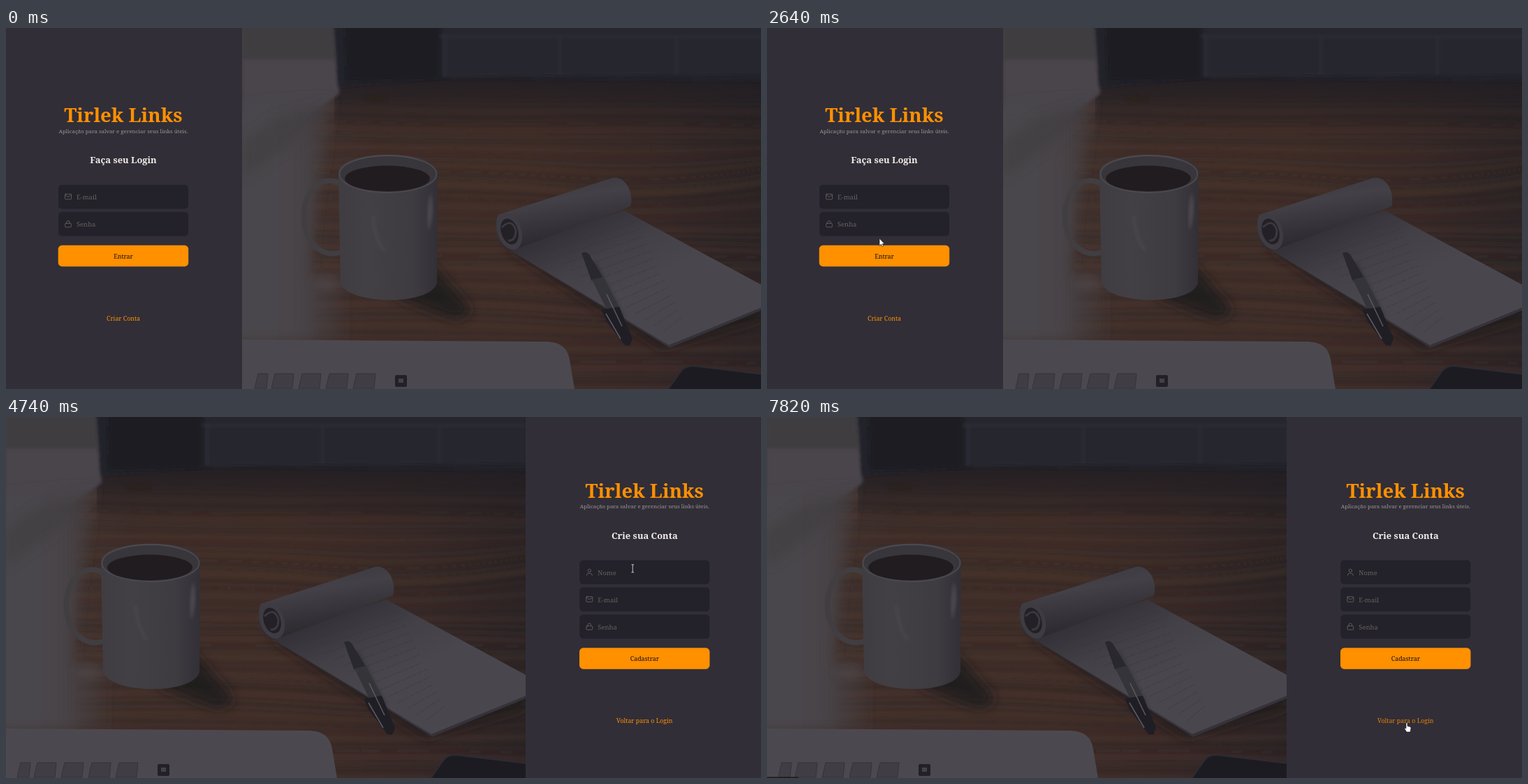
Recreate the animation shown at these times as an HTML page. Size 1081 px wide and 518 px high, loop 8 s.

```html
<!DOCTYPE html>
<html lang="pt-BR">
<head>
<meta charset="utf-8">
<title>Login</title>
<style>
html, body { margin: 0; width: 100%; height: 100%; overflow: hidden; background: #312e38; }
svg { display: block; width: 100vw; height: 100vh; }
text { font-family: "Noto Serif", "DejaVu Serif", serif; }
.icon { fill: none; stroke: #666360; stroke-width: .9; stroke-linejoin: round; stroke-linecap: round; }
.hover { filter: brightness(.9); }
</style>
</head>
<body>
<svg id="stage" viewBox="0 0 1081 518">
  <defs>
    <linearGradient id="wood">
      <stop offset="0" stop-color="#443937"/><stop offset=".25" stop-color="#402f2a"/>
      <stop offset=".55" stop-color="#402e29"/><stop offset=".8" stop-color="#382a28"/>
      <stop offset="1" stop-color="#2d2526"/>
    </linearGradient>
    <linearGradient id="glare">
      <stop offset="0" stop-color="#49474d"/><stop offset=".55" stop-color="#48454a"/>
      <stop offset="1" stop-color="#48454a" stop-opacity="0"/>
    </linearGradient>
    <linearGradient id="shade" x2="0" y2="1">
      <stop offset="0" stop-color="#1f1d22"/><stop offset="1" stop-color="#1f1d22" stop-opacity="0"/>
    </linearGradient>
    <linearGradient id="cup">
      <stop offset="0" stop-color="#3f3d42"/><stop offset=".3" stop-color="#424045"/>
      <stop offset=".75" stop-color="#3e3c41"/><stop offset="1" stop-color="#323036"/>
    </linearGradient>
    <linearGradient id="roll" x2=".3" y2="1">
      <stop offset="0" stop-color="#37353b"/><stop offset=".4" stop-color="#434147"/>
      <stop offset="1" stop-color="#29272c"/>
    </linearGradient>
    <linearGradient id="page" gradientUnits="userSpaceOnUse" x1="460" y1="288" x2="510" y2="395">
      <stop offset="0" stop-color="#343238"/><stop offset=".5" stop-color="#434147"/>
      <stop offset="1" stop-color="#49474d"/>
    </linearGradient>
    <filter id="soft" x="-50%" y="-50%" width="200%" height="200%"><feGaussianBlur stdDeviation="8"/></filter>
    <filter id="edge" x="-20%" y="-20%" width="140%" height="140%"><feGaussianBlur stdDeviation="2"/></filter>
    <clipPath id="frame"><rect x="-2" width="746" height="518"/></clipPath>
    <g id="photo" clip-path="url(#frame)">
      <rect x="-2" width="746" height="518" fill="url(#wood)"/>
      <g id="grain" fill="none" filter="url(#edge)"></g>
      <path d="M130 60H744V160H130Z" fill="url(#shade)"/>
      <path d="M262 330L325 402Q318 425 285 412L215 385Z" fill="#1f1a1d" opacity=".85" filter="url(#soft)"/>
      <path d="M-2 0H134L137 95L-2 190Z" fill="#48454b" filter="url(#edge)"/>
      <path d="M-20 115L130 100L105 250L95 350L150 375V448H-20Z" fill="url(#glare)" filter="url(#soft)"/>
      <path d="M-2 165L45 130L130 105L70 165L-2 215Z" fill="#413c40" opacity=".6" filter="url(#soft)"/>
      <ellipse cx="122" cy="364" rx="20" ry="8" fill="#544f52" opacity=".6" filter="url(#soft)"/>
      <path d="M-2 -5H128L132 45H-2Z" fill="#403e40" filter="url(#edge)"/>
      <path d="M129 -5H750V76L280 72L136 84Z" fill="#23232a" filter="url(#edge)"/>
      <path d="M146 -5H280V73L148 76Z" fill="#1c1b21" filter="url(#edge)"/>
      <path d="M285 -5H750V66L285 70Z" fill="#28282f" filter="url(#edge)"/>
      <path d="M280 12H744M288 8V70M453 12V68M620 10V67" fill="none" stroke="#2e2e35" stroke-width="3" filter="url(#edge)"/>
      <ellipse cx="190" cy="101" rx="16" ry="5" fill="#29201f" filter="url(#edge)"/>

      <path d="M140 224C108 208 87 236 86.500 270C87 308 112 330 139 322" fill="none" stroke="#413e42" stroke-width="7.500"/>
      <path d="M136 208C136 174 277 172 278 208L277 366C268 399 150 398 139 366Z" fill="url(#cup)"/>
      <ellipse cx="207" cy="209.500" rx="69.500" ry="26.500" fill="#38363b" stroke="#4c4a50" stroke-width="1.800"/>
      <ellipse cx="206" cy="216" rx="61" ry="18.500" fill="#211c20"/>
      <path d="M268 236Q275 262 265 292Q261 260 268 236Z" fill="#5a575e" opacity=".6" filter="url(#edge)"/>
      <path d="M185 270Q190 310 203 320" fill="none" stroke="#5c5960" stroke-width="4" opacity=".3" filter="url(#edge)"/>

      <path d="M372 312L600 460L744 418V402Z" fill="#201b1e" filter="url(#soft)"/>
      <path d="M374 314L545 262L744 370V403L610 458Z" fill="url(#page)"/>
      <path d="M374 314L609 455L744 400V404L610 459Z" fill="#353239"/>
      <g id="writing" stroke="#37353d" fill="none"></g>
      <path d="M365 268L525 216C546 208 560 237 554 256L386 319C365 318 356 288 365 268Z" fill="url(#roll)"/>
      <ellipse cx="381" cy="292" rx="17" ry="27" transform="rotate(-18 381 292)" fill="#3e3c42"/>
      <ellipse cx="381" cy="292" rx="12" ry="19" transform="rotate(-18 381 292)" fill="#232126"/>
      <path d="M370 286Q384 272 390 290Q390 306 379 305" fill="none" stroke="#3b393f" stroke-width="3"/>
      <path d="M500 338L538 410L548 450" fill="none" stroke="#2c2a30" stroke-width="10" opacity=".6" filter="url(#edge)"/>
      <path d="M484 323Q490 319 495 325L516 360L510 367L498 362Z" fill="#29282e"/>
      <path d="M499 361L515 357L541 407L525 414Z" fill="#353439"/>
      <path d="M512 404L538 400L557 446L553 456L546 455L520 421Z" fill="#1f1e24"/>
      <path d="M520 382L542 428M519 410L540 446" stroke="#5d5a61" stroke-width="1.500" fill="none"/>

      <path d="M-2 447L435 450Q463 451 467 476L474 518H-2Z" fill="#4b494f"/>
      <g id="keys"></g>
      <path d="M607 520L626 493Q632 484 645 485L746 497V520Z" fill="#1c1b21" stroke="#2d2b32" stroke-width="2"/>
    </g>
    <g id="mail" class="icon"><rect x=".5" y="1" width="9" height="7.500" rx="1"/><path d="M.6 2L5 5.300L9.400 2"/></g>
    <g id="lock" class="icon"><rect x=".7" y="4" width="8.600" height="5.500" rx="1"/><path d="M2.800 4V2.500Q2.900 .3 5 .3T7.200 2.500V4"/></g>
    <g id="user" class="icon"><circle cx="5" cy="2.600" r="2.200"/><path d="M1 9.500Q1 6.500 3.500 6.500H6.500Q9 6.500 9 9.500"/></g>
  </defs>
  <g id="login"></g>
  <g id="signup"></g>
  <rect id="status" y="516.500" height="1.500" fill="#1b1a1f"/>
  <rect id="caret" width="1" height="12" fill="#f4ede8"/>
  <circle id="halo" r="7" fill="#c4b800" opacity=".7"/>
  <g id="cursor" stroke-linejoin="round">
    <path id="arrow" d="M0 0V10.500L2.400 8.300L4 11.800L5.600 11L4.100 7.700H7.200Z" fill="#fff" stroke="#18171c" stroke-width=".6"/>
    <path id="hand" d="M-1 0Q0 -1.200 1 0V4.500L5 5.500Q6.200 6 6 7.500L5 13H-.2L-3 8.500Q-2.800 6.500 -1 8Z" fill="#fff" stroke="#18171c" stroke-width=".6"/>
    <path id="beam" d="M-1.800 -5.500H1.800M0 -5.500V5.500M-1.800 5.500H1.800" fill="none" stroke="#d8d6d8" stroke-width=".9"/>
  </g>
</svg>
<script>
const $ = id => document.getElementById(id);
const LOOP = 8000, SWITCH = 3810, BLINK = 530;

const label = (s, x, y, size, fill, extra = '') =>
  `<text x="${x}" y="${y}" font-size="${size}" fill="${fill}" ${extra}>${s}</text>`;

function form(x, top, heading, fields, action, link) {
  const mid = x + 93, btn = top + fields.length * 39 + 9;
  const center = 'text-anchor="middle"', medium = center + ' font-weight="500"', bold = center + ' font-weight="700"';
  const rows = fields.map(([icon, name], i) => {
    const y = top + i * 39;
    return `<rect x="${x}" y="${y}" width="186" height="34.500" rx="5" fill="#232129"/>
      <use href="#${icon}" x="${x + 9}" y="${y + 12.3}"/>` + label(name, x + 26, y + 21, 9.4, '#666360');
  }).join('');
  return `<rect x="${x < 338 ? 0 : 744}" width="338" height="518" fill="#312e38"/>` +
    label('Tirlek Links', mid, top - 90, 27.6, '#ff9000', bold) +
    label('Aplicação para salvar e gerenciar seus links úteis.', mid, top - 74.5, 7.85, '#999591', center) +
    label(heading, mid, top - 31, 12.9, '#f4ede8', bold) + rows +
    `<g class="button"><rect x="${x - .3}" y="${btn - .2}" width="186.500" height="30.400" rx="5.500" fill="#ff9000"/>` +
    label(action, mid, btn + 18.8, 8.9, '#0f0d12', medium) + '</g>' +
    `<g class="link">${label(link, mid, btn + 107.7, 8.8, '#ff9000', medium)}</g>`;
}

$('login').innerHTML = '<use href="#photo" x="340"/>' + form(75, 225, 'Faça seu Login',
  [['mail', 'E-mail'], ['lock', 'Senha']], 'Entrar', 'Criar Conta');
$('signup').innerHTML = '<use href="#photo"/>' + form(821.3, 205.5, 'Crie sua Conta',
  [['user', 'Nome'], ['mail', 'E-mail'], ['lock', 'Senha']], 'Cadastrar', 'Voltar para o Login');

const repeat = (n, f) => Array.from({ length: n }, (_, i) => f(i)).join('');
$('grain').innerHTML = repeat(46, i => {
  const y = 85 + i * 9.5, k = Math.sin(i * 12.9) * 8;
  return `<path d="M100 ${y}Q300 ${y + k} 450 ${y + 5}T750 ${y + k}" stroke="${i % 3 ? '#2b211f' : '#5b3d2d'}"
    stroke-width="${3 + i % 4}" opacity="${.1 + .12 * Math.abs(k / 8)}"/>`;
});
$('writing').innerHTML = repeat(14, i => {
  const x = 543 + i * 5, y = 281 + i * 10.5;
  const left = 428 + i * 13.3, ly = 322 + i * 8.8;
  return `<path d="M${left} ${ly}L${x + 20} ${y - 3}" stroke-width=".8"
    stroke-dasharray="${5 + i % 4} 1.500 9 2" opacity=".65"/>`;
});
$('keys').innerHTML = repeat(5, i => {
  const x = i ? 1 + i * 39 : 16, w = i ? 34 : 21;
  return `<path d="M${x + 5} 496H${x + w - 2}L${x + w - 4} 517H${x}Z" fill="#403e44" stroke="#353339"/>`;
}) + '<rect x="217" y="498" width="17" height="17" rx="2" fill="#222127"/><rect x="222" y="503" width="7" height="6" fill="#444249"/>';

// time, x, y of the pointer
const path = [
  [220, 1060, 525], [1020, 163, 259], [1390, 139, 243], [1540, 139, 243], [2080, 139, 279],
  [2360, 139, 279], [2640, 161, 302], [3220, 183, 416], [4020, 183, 416], [4810, 913, 213],
  [4890, 907, 210], [5030, 899, 222], [5250, 893, 262], [5550, 893, 289], [5700, 893, 291],
  [6160, 895, 300], [6240, 895, 300], [6570, 914, 383], [6720, 916, 384], [6800, 916, 384], [7450, 916, 439]
];
// time, x, top of the focused field's caret
const focus = [[1390, 101, 236], [2100, 101, 275.5], [SWITCH, 0, 0],
  [5030, 847, 217], [5270, 847, 256], [6230, 847, 295]];
const clicks = [1390, 2100, 3700, 5030, 5270, 6200];

function pointer(t) {
  const i = path.findIndex(p => p[0] > t);
  if (i < 0) return path.at(-1).slice(1);
  const a = path[Math.max(i - 1, 0)], b = path[i];
  const u = Math.max(0, (t - a[0]) / (b[0] - a[0])), e = u * u * (3 - 2 * u);
  return [a[1] + (b[1] - a[1]) * e, a[2] + (b[2] - a[2]) * e];
}

const show = (el, on) => el.style.display = on ? '' : 'none';
const move = (el, x, y) => el.setAttribute('transform', `translate(${x} ${y})`);

function draw(t) {
  const second = t >= SWITCH, [x, y] = pointer(t);
  show($('login'), !second);
  show($('signup'), second);

  const left = second ? 821.3 : 75, top = second ? 205.5 : 225, n = second ? 3 : 2;
  const btn = top + n * 39 + 9, inside = x > left && x < left + 186;
  const onButton = inside && y >= btn && y < btn + 30;
  const onLink = Math.abs(x - left - 93) < (second ? 41 : 25) && Math.abs(y - btn - 104.5) < 8;
  const row = (y - top) % 39;
  const onInput = inside && x > left + 26 && y > top && y < btn - 9 && row > 10 && row < 25;
  const page = $(second ? 'signup' : 'login');
  page.querySelector('.button').classList.toggle('hover', onButton);
  page.querySelector('.link').classList.toggle('hover', onLink);

  show($('cursor'), t >= 290);
  move($('cursor'), x, y);
  show($('hand'), onLink || onButton);
  show($('beam'), onInput);
  show($('arrow'), !onLink && !onButton && !onInput);

  show($('halo'), clicks.some(c => t >= c - 50 && t < c + 105));
  move($('halo'), x, y);

  const f = focus.findLast(f => f[0] <= t);
  show($('caret'), f && f[1] && Math.floor((t - f[0]) / BLINK) % 2 === 0);
  if (f) move($('caret'), f[1], f[2]);

  show($('status'), (t >= 3520 && t < 4090) || t >= 7600);
  $('status').setAttribute('width', second && t > 7000 ? 45 : 72);
}

function tick(now) {
  draw(now % LOOP);
  requestAnimationFrame(tick);
}
draw(0);
requestAnimationFrame(tick);
</script>
</body>
</html>
```
